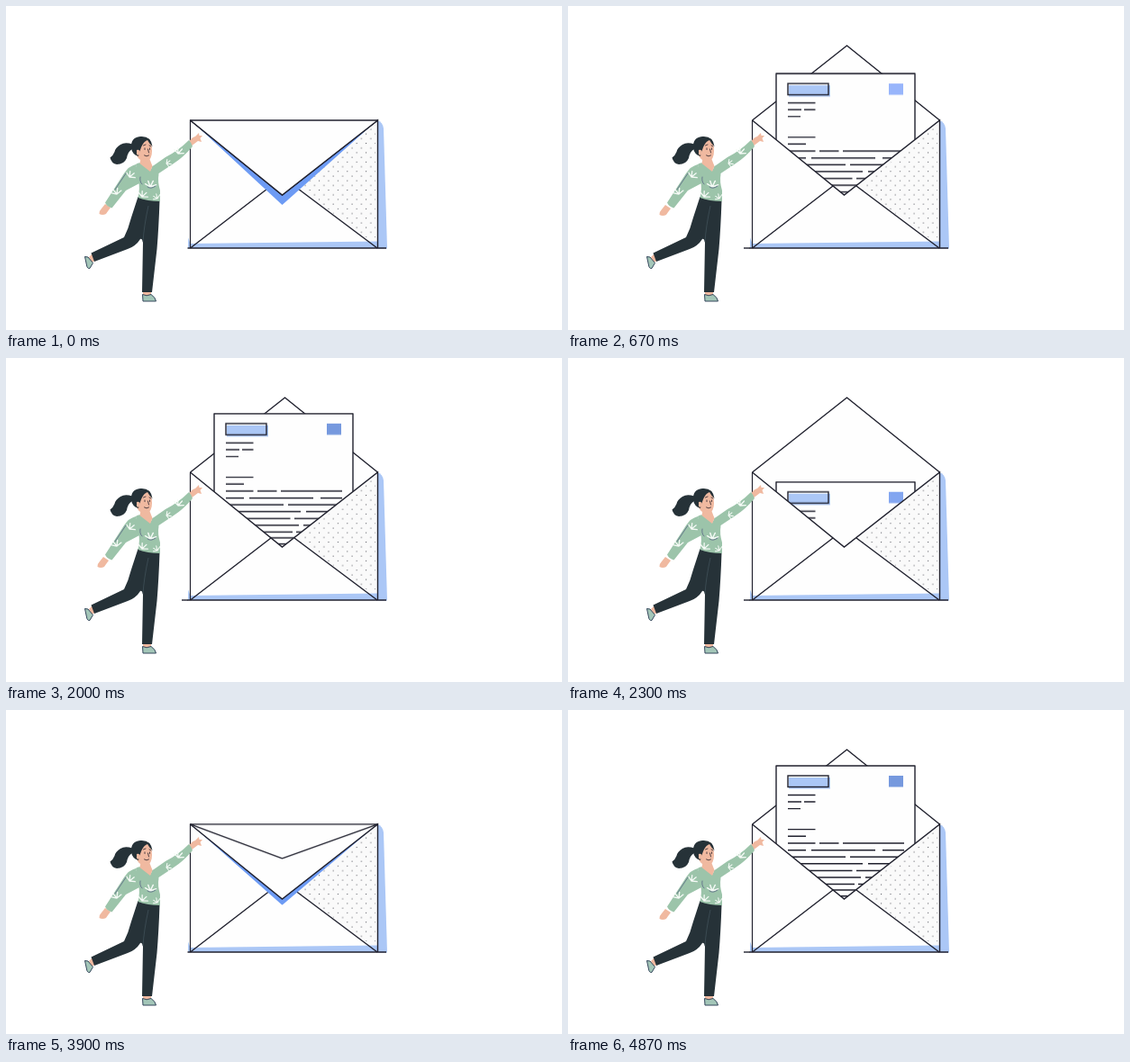
An HTML page without scripts for the animation above (5.87 s loop, 617 px wide and 360 px high).

```html
<!DOCTYPE html>
<html lang="en">
<head>
<meta charset="utf-8">
<title>Opening envelope</title>
<style>
html, body { margin: 0; width: 100%; height: 100%; overflow: hidden; background: #fff; }
svg { display: block; width: 100vw; height: 100vh; }

.line { fill: none; stroke: #20212e; stroke-width: 1.4; }
.paper { fill: #fefefe; stroke: #20212e; stroke-width: 1.4; stroke-linejoin: round; }
.pale { fill: #abc7f6; }
.skin { fill: #f0b9a0; }
.dark { fill: #263238; }
.green { fill: #9cc4aa; }
.shoe { fill: #a3c6b8; stroke: #35475c; }
.leaf { fill: none; stroke: #f5faf6; stroke-width: 1.3; stroke-linecap: round; }
.fold { fill: none; stroke: #66788c; stroke-width: 1; stroke-linecap: round; }

/* Everything shares one 5.87 s clock */
.flap, .shadow, .letter, .stamp, .open, .shut, .hand { animation: 5.87s linear infinite; }
.flap, .shadow { transform-origin: 0 127px; }
.flap { vector-effect: non-scaling-stroke; animation-name: flap; }
.shadow { fill: #6d9bf4; animation-name: shadow; }
.letter { animation-name: slide; }
.stamp { animation-name: tint; }
.open { animation-name: show; }
.shut { animation-name: hide; }
.hand { animation-name: reach; }

@keyframes flap {
  0%, 1.17% { transform: scaleY(1); }
  1.19% { transform: scaleY(.47); animation-timing-function: ease-out; }
  4.6%, 41.57% { transform: scaleY(-1); animation-timing-function: ease-in; }
  44.04% { transform: scaleY(0); animation-timing-function: ease-out; }
  46%, 66.42% { transform: scaleY(1); }
  66.44% { transform: scaleY(.47); animation-timing-function: ease-out; }
  69.85%, 100% { transform: scaleY(-1); }
}
@keyframes shadow {
  0%, 1.17% { transform: scaleY(1); }
  1.19% { transform: scaleY(.957); }
  2.5%, 44.04% { transform: scaleY(.86); }
  46%, 66.42% { transform: scaleY(1); }
  66.44% { transform: scaleY(.957); }
  67.8%, 100% { transform: scaleY(.86); }
}
@keyframes slide {
  0%, 4.28% { transform: translateY(145px); animation-timing-function: cubic-bezier(.36, -.01, .5, 1.38); }
  16.2% { transform: none; }
  34.07% { transform: none; animation-timing-function: cubic-bezier(.5, -.38, .64, 1.01); }
  42.25%, 69.65% { transform: translateY(145px); animation-timing-function: cubic-bezier(.36, -.01, .5, 1.38); }
  81.57%, 100% { transform: none; }
}
@keyframes tint {
  0%, 11.5% { fill: #98b5fb; }
  16.18%, 34.07% { fill: #7699de; }
  42.25%, 76.2% { fill: #8aaefb; }
  81.43%, 100% { fill: #7699de; }
}
@keyframes show {
  0%, 7.48% { visibility: hidden; }
  7.5%, 43.8% { visibility: visible; }
  43.82%, 72.72% { visibility: hidden; }
  72.74%, 100% { visibility: visible; }
}
@keyframes hide {
  0%, 1.85% { visibility: visible; }
  1.87%, 44.02% { visibility: hidden; }
  44.04%, 67.1% { visibility: visible; }
  67.12%, 100% { visibility: hidden; }
}
@keyframes reach {
  0%, 1.2% { transform: none; }
  4.6%, 42.25% { transform: translate(-2px, 1px); }
  46%, 66.44% { transform: none; }
  69.85%, 100% { transform: translate(-2px, 1px); }
}
</style>
</head>
<body>
<svg viewBox="0 0 617 360" preserveAspectRatio="none">
  <defs>
    <clipPath id="above"><path d="M0 0H617V127.7H0Z"/></clipPath>
    <clipPath id="below"><path d="M0 126H617V360H0Z"/></clipPath>
    <clipPath id="mouth"><path d="M204.500 0V127L306.500 210L412.500 127V0Z"/></clipPath>
    <clipPath id="pocket"><path d="M204.500 127L306.500 210L412.500 127V269H204.500Z"/></clipPath>
    <pattern id="dots" x="330" y="135" width="10.400" height="10.400" patternUnits="userSpaceOnUse">
      <circle cx="2" cy="2" r=".65" fill="#4d4f57"/>
      <circle cx="7.200" cy="7.200" r=".65" fill="#4d4f57"/>
    </pattern>
    <g id="sprig">
      <path class="leaf" d="M0 0L-5 -3M0 0L-2 -6M0 0L3 -6M0 0L6 -2"/>
    </g>
  </defs>
  <rect width="617" height="360" fill="#fff"/>

  <!-- Raised flap and letter, behind the pocket -->
  <g clip-path="url(#above)">
    <path class="paper flap" d="M204.500 127L309.500 210L412.500 127"/>
  </g>
  <path fill="#fefefe" d="M204.500 127H412.500L306.500 210Z"/>
  <g clip-path="url(#mouth)">
    <g class="open">
      <g class="letter">
        <rect class="paper" x="231" y="62" width="154" height="170"/>
        <rect class="pale" x="245" y="75" width="46" height="12.500"/>
        <rect class="line" x="244" y="73" width="45" height="12.500"/>
        <rect class="stamp" x="356" y="73" width="16" height="12.500"/>
        <path class="line" d="M244 94.500H274.500M244 102H259M262 102H274.500M244 109.600H258
          M244 132.600H274.500M244 140.300H264M244 148H274.500M279 148H300.500M305 148H373
          M244 155.700H264M270 155.700H341M349 155.700H373M244 163.300H308M313 163.300H373
          M244 170.800H327M333 170.800H373M244 178.500H315.500M320 178.500H373
          M244 186H325M330 186H373M244 193.500H318M322 193.500H373M244 200H373M244 206.800H373"/>
      </g>
    </g>
  </g>

  <!-- Envelope body -->
  <path class="pale" d="M412 127Q418 129 419 136L423 269.500H412Z"/>
  <path fill="#fefefe" d="M204.500 127L306.500 210L412.500 127V269H204.500Z"/>
  <path fill="#fafafa" d="M412 127L320 200L412 268Z"/>
  <path fill="url(#dots)" d="M410 132L323 202L410 264Z"/>
  <path class="pale" d="M202 257L204.500 264L412 261.500V269H202Z"/>
  <path class="line" d="M204.500 269L294 200M320 200L412 269"/>
  <g clip-path="url(#pocket)"><path class="shadow" d="M205 127L306.500 221L412 127Z"/></g>
  <path class="line" d="M204.500 127L306.500 210L412.500 127V269"/>
  <path class="line" style="stroke-width:1.2" d="M204.500 127V269"/>
  <path class="line" d="M201.500 269H422"/>
  <path class="line open" d="M195 269H202"/>

  <g class="shut" clip-path="url(#below)">
    <path class="paper flap" d="M204.500 127L306.500 210L412.500 127Z"/>
  </g>

  <!-- Woman -->
  <g>
    <path class="skin" d="M98 273L92 279L95 285L101 282ZM152 316H161V322H152Z"/>
    <path class="shoe" d="M87.500 278.500L91 279L96.500 285.500L93 291.500Q90 292 89.500 288Z"/>
    <path class="shoe" d="M151.500 320.500Q156 323 161 320.500Q166 324 166.500 328H152Z"/>

    <path class="skin hand" d="M110 220L116 224Q113 228 111 231Q107 233 103.500 231Q103 228 106 225Z"/>
    <path class="green" d="M144 176Q136 178 131 186L110 218.500Q112 223 117.500 224.500L133 205L150 196Z"/>
    <use href="#sprig" transform="translate(123 209) rotate(-20)"/>
    <use href="#sprig" transform="translate(137 190) rotate(25)"/>
    <path class="fold" d="M133 186L121 204"/>

    <path class="skin" d="M202 152Q206 146 210 145L214 141L214.500 144L218 144L215.500 147L217 151L213 150Q209 153 205 156Z"/>
    <path class="green" d="M162 178.500L177 168Q191 161 203 149Q206 152 207 156Q197 168 186 175L168 187Z"/>
    <use href="#sprig" transform="translate(191 164) rotate(15)"/>
    <use href="#sprig" transform="translate(178 175) rotate(70) scale(.8)"/>

    <path class="dark" d="M146.500 212L170.500 216Q169.500 246 167.500 270L162 318H151L152 263Q151 258 149 259Q144 267 135 270L98 284L94.500 274.500L131 257Q136 247 139 235Z"/>
    <path d="M158 222Q153 245 152 262" fill="none" stroke="#44555e" stroke-width=".7"/>
    <path class="green" d="M144 176Q147 173 152 175L160 183L163 177.500Q169 180 169.500 187Q168 195 171 205V217Q157 217 146.500 213Q149 202 147 194Z"/>
    <path class="skin" d="M149.500 169H159L162.500 178L160 184L148.500 175Z"/>
    <use href="#sprig" transform="translate(160 201) scale(1.100)"/>
    <use href="#sprig" transform="translate(151 212) rotate(20)"/>
    <use href="#sprig" transform="translate(168 214) rotate(-40) scale(.8)"/>
    <path class="fold" d="M149 190Q148 195 151 198M157 201Q161 204 166 200"/>

    <path class="dark" d="M140 153.500Q132 151 127 154Q121 158 120.500 162Q119 166 115.500 168.500Q117 175 123 176Q131 176 134 169Q135 162 140 159Z"/>
    <path class="skin" d="M144 151L158 147Q162 153 162 161Q162 171 156 172.500Q148 173 145 166Z"/>
    <path class="dark" d="M139 158Q138 146 149 145Q161 144 162.500 156Q159 153 157 149Q153 150 150 157Q148 162 147 167Q140 165 139 158Z"/>
    <path class="skin" d="M145 160Q149 159 149 164Q148 167 145 165Z"/>
    <path d="M152.500 155L155 154M159 155L161 156M154 158V159.500M159.500 158V159.500M157.500 159L158.500 163M153.500 166Q156 168 158.500 166" fill="none" stroke="#3f3338" stroke-width=".9" stroke-linecap="round"/>
  </g>
</svg>
</body>
</html>
```
